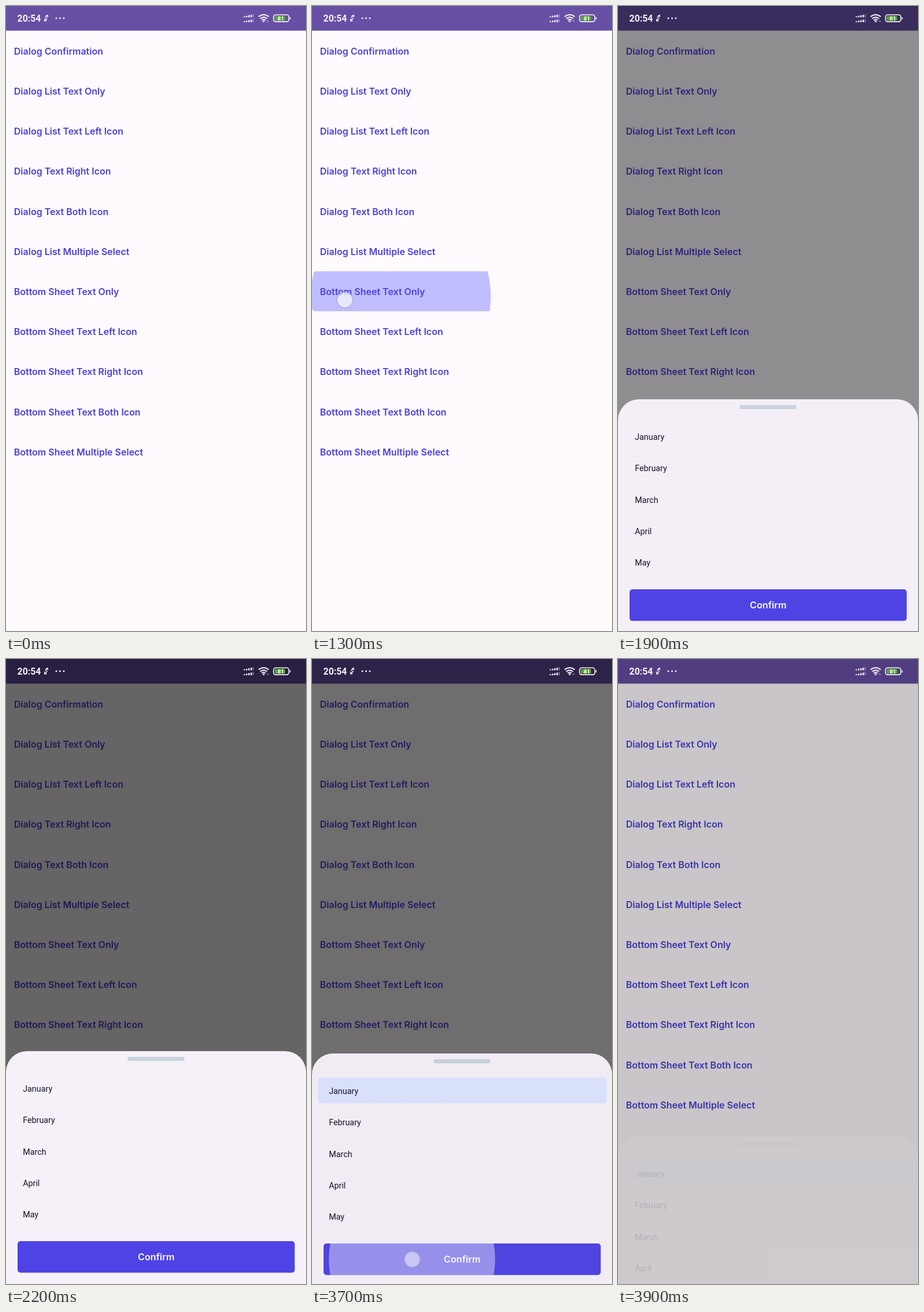
An HTML page that plays this animation: 519 px wide and 1079 px high, repeating every 4000 ms.

```html
<!DOCTYPE html>
<html lang="en">
<head>
<meta charset="utf-8">
<title>Dialogs and sheets</title>
<style>
  html, body { margin: 0; width: 100%; height: 100%; overflow: hidden; background: #fffafe; }
  svg { display: block; width: 100vw; height: 100vh; }
  .item { font: 600 16px Inter, sans-serif; fill: #4a40da; }
  .month { font: 400 14.3px Roboto, sans-serif; fill: #14122a; }
  .label { font: 600 16.2px Inter, sans-serif; fill: #fff; text-anchor: middle; }
  .clock { font: 600 15.8px Roboto, sans-serif; fill: #f6f2fb; }
  .charge { font: 700 9.5px Roboto, sans-serif; fill: #fff; text-anchor: middle; }
</style>
</head>
<body>
<svg viewBox="0 0 519 1079">
  <defs>
    <clipPath id="rowClip"><rect x="0" y="458" width="519" height="69" rx="6"/></clipPath>
    <clipPath id="btnClip"><rect x="20" y="1005" width="479.5" height="54.5" rx="5"/></clipPath>
  </defs>
  <rect width="519" height="1079" fill="#fffafe"/>
  <rect width="519" height="42.5" fill="#674fa4"/>
  <g id="items"></g>
  <circle id="rowRipple" clip-path="url(#rowClip)" fill="#464bfa"/>
  <rect id="dim" width="519" height="1079"/>

  <g fill="#f6f2fb">
    <text class="clock" x="19.6" y="27">20:54</text>
    <circle cx="87" cy="21" r="1.5"/><circle cx="93.5" cy="21" r="1.5"/><circle cx="100" cy="21" r="1.5"/>
    <path d="M68.5 17.5 L72 15.5 L72.5 19 M72 16 L67.5 20.5 M71.5 20.5 L67 25.5 M66.5 22 L67 26 L70.5 25"
      fill="none" stroke="#f6f2fb" stroke-width="1.4"/>
    <g id="signal"></g>
    <g fill="none" stroke="#f6f2fb" stroke-width="2">
      <path d="M437 18.5 Q445.700 11.500 454.500 18.500"/>
      <path d="M439.700 21.700 Q445.700 17 451.700 21.700"/>
      <path d="M442.300 24.500 Q445.700 22 449 24.500"/>
    </g>
    <circle cx="445.700" cy="26.600" r="1.700"/>
    <path d="M451 26.500 L452 24.500 M453 28 L454 25.500" stroke="#f6f2fb" opacity=".7"/>
    <rect x="462.800" y="15.300" width="26.500" height="11.800" rx="3.500" fill="none" stroke="#f6f2fb" stroke-width="1.600"/>
    <rect x="464.800" y="17.200" width="18" height="8" rx="1.500" fill="#55a82f"/>
    <rect x="490.700" y="19" width="1.600" height="4.500" rx=".8"/>
    <text class="charge" x="475.500" y="24.700">81</text>
  </g>

  <g id="sheet">
    <path d="M0 1290 V713 A36 36 0 0 1 36 677 H483 A36 36 0 0 1 519 713 V1290 Z" fill="#f6f1f8"/>
    <rect x="210" y="687" width="99" height="7" rx="3.5" fill="#cad4df"/>
    <rect id="picked" x="10" y="718.5" width="499.500" height="44.500" rx="5" fill="#dde4ff"/>
    <g id="months"></g>
    <rect x="20" y="1005" width="479.500" height="54.500" rx="5" fill="#4f43e5"/>
    <circle id="btnRipple" clip-path="url(#btnClip)" fill="#fff"/>
    <text class="label" x="259.800" y="1038.300">Confirm</text>
  </g>
  <g id="touch">
    <circle r="16" fill="#a9a3e0" opacity=".15"/>
    <circle r="13.500" fill="#fff" fill-opacity=".65" stroke="#a29bd6" stroke-opacity=".6" stroke-width="1.400"/>
  </g>
</svg>
<script>
const NS = 'http://www.w3.org/2000/svg';
const LOOP = 4000, STEP = 100;
const $ = id => document.getElementById(id);
const clamp = v => Math.min(1, Math.max(0, v));
const ramp = (t, from, to) => clamp((t - from) / (to - from));

function set(node, attrs) {
  for (const k in attrs) node.setAttribute(k, attrs[k]);
  return node;
}
function add(parent, tag, attrs, text = '') {
  const node = set(document.createElementNS(NS, tag), attrs);
  node.textContent = text;
  return parent.appendChild(node);
}

['Dialog Confirmation', 'Dialog List Text Only', 'Dialog List Text Left Icon',
 'Dialog Text Right Icon', 'Dialog Text Both Icon', 'Dialog List Multiple Select',
 'Bottom Sheet Text Only', 'Bottom Sheet Text Left Icon', 'Bottom Sheet Text Right Icon',
 'Bottom Sheet Text Both Icon', 'Bottom Sheet Multiple Select'
].forEach((s, i) => add($('items'), 'text', { class: 'item', x: 13.8, y: 83.8 + 69.2 * i }, s));

['January', 'February', 'March', 'April', 'May'].forEach((s, i) =>
  add($('months'), 'text', { class: 'month', x: 29.2, y: 747 + 54.25 * i }, s));

for (const base of [19.5, 28])
  for (let i = 0; i < 5; i++) {
    const h = 1.8 + i * 0.9;
    add($('signal'), 'rect', {
      x: 411 + i * 4, y: base - h, width: i < 4 ? 2.6 : 1.4, height: h, opacity: i < 4 ? 0.95 : 0.5
    });
  }

// A press ripple grows from 30% of the width to the corners while drifting to the centre.
function ripple(node, box, press, start, fadeFrom, fadeTo, strength, t) {
  const full = Math.hypot(box.w, box.h) / 2, r0 = box.w * 0.3;
  let dx = press.x - box.x, dy = press.y - box.y;
  const k = Math.min(1, (full - r0) / Math.hypot(dx, dy));
  const e = 1 - (1 - ramp(t, start, start + 225)) ** 2;
  dx *= k * (1 - e);
  dy *= k * (1 - e);
  set(node, {
    cx: box.x + dx, cy: box.y + dy, r: r0 + (full - r0) * e,
    opacity: t < start ? 0 : strength * (1 - ramp(t, fadeFrom, fadeTo))
  });
}

const row = { x: 259.5, y: 492.5, w: 519, h: 69 };
const button = { x: 259.7, y: 1032.2, w: 479.5, h: 54.5 };
const taps = [
  { x: 57, y: 507.5, from: 1200, fade: 1320, to: 1420 },
  { x: 61, y: 749.5, from: 2600, fade: 2770, to: 2900 },
  { x: 173.5, y: 1036.5, from: 3600, fade: 3670, to: 3790 }
];

function sheetState(t) {
  if (t < 1634) return { y: 206, alpha: 0 };
  if (t < 3660) {
    const rest = Math.exp((1634 - t) / 58);
    return { y: 206 * rest, alpha: 1 - rest };
  }
  const p = (t - 3660) / 240;
  return { y: 147 * p * p, alpha: clamp(1 - 0.89 * p ** 1.9) };
}

function draw(t) {
  const sheet = sheetState(t);
  set($('sheet'), { transform: `translate(0 ${sheet.y.toFixed(2)})`, opacity: sheet.alpha });
  set($('dim'), { opacity: 0.6 * (ramp(t, 1616, 2003) - ramp(t, 3677, 4020)) });
  set($('picked'), { opacity: t >= 2700 ? 1 : 0 });
  ripple($('rowRipple'), row, taps[0], 1300, 1580, 1740, 0.34, t);
  ripple($('btnRipple'), button, { x: 173, y: 1032.5 }, 3700, 3850, 4000, 0.42, t);

  const tap = taps.find(p => t >= p.from && t < p.to);
  set($('touch'), { opacity: tap ? 1 - ramp(t, tap.fade, tap.to) : 0 });
  if (tap) set($('touch'), { transform: `translate(${tap.x} ${tap.y})` });
}

const begin = performance.now();
function tick(now) {
  const t = Math.max(0, now - begin) % LOOP;
  draw(Math.floor(t / STEP) * STEP);
  requestAnimationFrame(tick);
}
draw(0);
requestAnimationFrame(tick);
</script>
</body>
</html>
```
